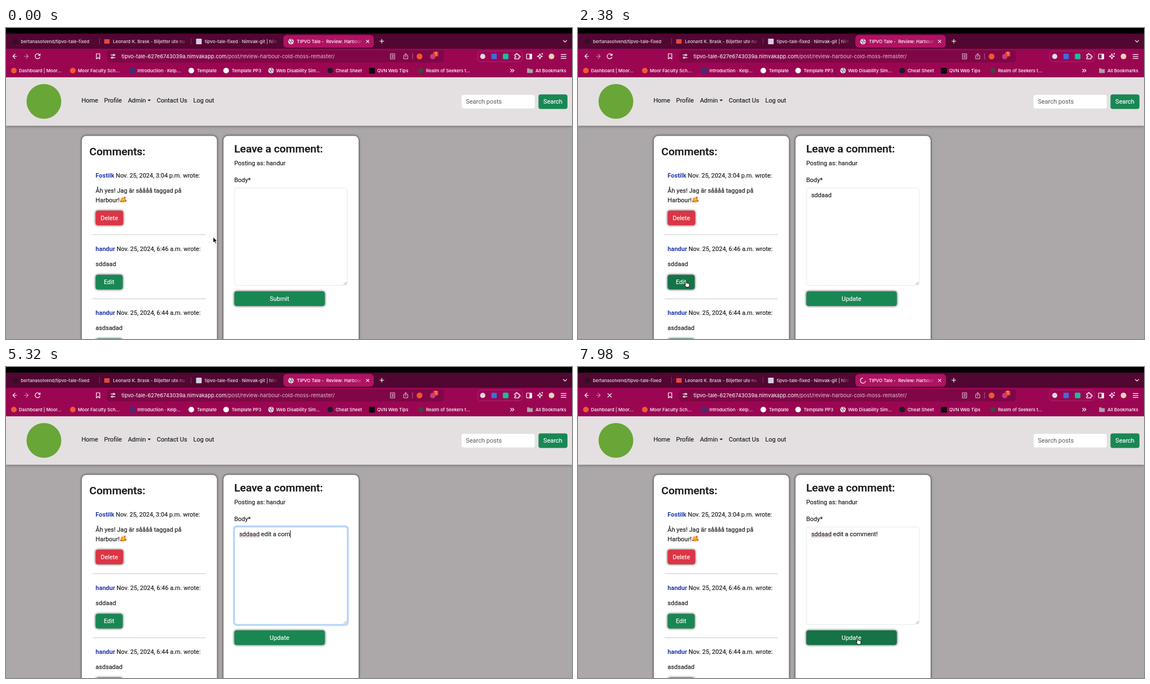
These frames come from a looping animation (1008 by 555 pixels, 8 s). An HTML page:

```html
<!DOCTYPE html>
<html lang="en">
<head>
<meta charset="utf-8">
<title>Edit a comment</title>
<style>
  html, body { margin: 0; width: 100%; height: 100%; overflow: hidden; background: #aca8a9; }
  svg { display: block; width: 1008px; height: 555px; }
  text { white-space: pre; }
  .ui { font: 500 8px Inter, sans-serif; fill: #fff; }
  .tab { fill: #ecd9e3; }
  .url { font-size: 9.42px; font-weight: 400; }
  .page { font: 400 11px Roboto, sans-serif; fill: #15171a; }
  .page text { stroke: #15171a; stroke-width: .15; }
  .page .head { font-size: 19.25px; font-weight: 500; stroke-width: .25; }
  .page .user { font-weight: 700; fill: #2039ab; stroke: none; }
  .page .btn { fill: #fff; stroke: #fff; text-anchor: middle; }
  .page .hint { fill: #54595e; stroke: none; }
  .line { fill: none; stroke: #fff; stroke-width: 1.2; stroke-linecap: round; stroke-linejoin: round; }
  .raised { filter: drop-shadow(0 0 2px rgba(0, 0, 0, .8)); }
  .card { fill: #fff; filter: drop-shadow(0 0 2.2px rgba(0, 0, 0, .85)); }
  .green { fill: #198754; }
  .rule { stroke: #c6c6c8; stroke-width: 1; }
</style>
</head>
<body>
<svg viewBox="0 0 1008 555">
  <defs>
    <linearGradient id="fadeStrip"><stop stop-color="#520632" stop-opacity="0"/><stop offset=".65" stop-color="#520632"/></linearGradient>
    <linearGradient id="fadeTab"><stop stop-color="#b01263" stop-opacity="0"/><stop offset=".65" stop-color="#b01263"/></linearGradient>
    <g id="globe">
      <circle r="5" fill="#f1e9ed"/>
      <path d="M-3.8-1.6Q-1.5-.8-1 .8T.6 3.8M-1.2-4.2Q2.4-3.6 1.4-1.6T4.2 .8" fill="none" stroke="#5d5660" stroke-width="1.3"/>
    </g>
  </defs>

  <!-- Page -->
  <rect width="1008" height="555" fill="#aca8a9"/>
  <rect y="88" width="1008" height="86.5" fill="#e4e0e2" style="filter:drop-shadow(0 1px 2.5px rgba(0,0,0,.4))"/>
  <circle cx="67.5" cy="131" r="31" fill="#68a637"/>
  <g class="page">
    <text x="134.5" y="133.3">Home</text>
    <text x="174.8" y="133.3">Profile</text>
    <text x="217.2" y="133.3">Admin</text>
    <path d="M252 127.8h6l-3 3z"/>
    <text x="268.6" y="133.3">Contact Us</text>
    <text x="333.6" y="133.3">Log out</text>
    <rect x="811" y="119" width="131" height="25" rx="4" fill="#fff" stroke="#dee2e6" stroke-width=".7"/>
    <text x="819" y="135.3" class="hint">Search posts</text>
    <rect x="948.3" y="118.4" width="51.6" height="26" rx="4" class="green"/>
    <text x="974" y="135.3" class="btn">Search</text>

    <rect x="135" y="192.5" width="240.7" height="390" rx="8" class="card"/>
    <rect x="387.3" y="192.5" width="240.7" height="390" rx="8" class="card"/>

    <text x="148.6" y="227.3" class="head">Comments:</text>
    <text x="159.6" y="266.8"><tspan class="user">Fostilk</tspan> Nov. 25, 2024, 3:04 p.m. wrote:</text>
    <text x="159.6" y="293.8">Åh yes! Jag är såååå taggad på</text>
    <text x="159.6" y="310.6">Harbour!</text>
    <g transform="translate(208.8 306.6)">
      <circle r="5.2" fill="#fcc33c"/>
      <path d="M-3-1.2q1-1.3 2 0M1-1.2q1-1.3 2 0M-2.3 1.6q2.3 2.4 4.6 0" fill="none" stroke="#713d12" stroke-width=".9"/>
      <g fill="#ef4055"><circle cx="-4" cy="2.8" r="1.6"/><circle cx="4.2" cy="1.8" r="1.6"/><circle cx="2.9" cy="-4.2" r="1.4"/></g>
    </g>
    <rect x="159.7" y="326" width="48.9" height="26" rx="4" fill="#dc3545" class="raised"/>
    <text x="184" y="342.8" class="btn">Delete</text>
    <path d="M154.5 368.8h201.5M154.5 483.2h201.5" class="rule"/>

    <text x="159.6" y="397.6"><tspan class="user">handur</tspan> Nov. 25, 2024, 6:46 a.m. wrote:</text>
    <text x="159.6" y="425">sddaad</text>
    <rect id="edit" x="159.7" y="440.4" width="48" height="26" rx="4" class="green raised"/>
    <text x="183.5" y="457.2" class="btn">Edit</text>

    <text x="159.6" y="512.1"><tspan class="user">handur</tspan> Nov. 25, 2024, 6:44 a.m. wrote:</text>
    <text x="159.6" y="539.4">asdsadad</text>
    <rect x="159.7" y="554.4" width="48" height="26" rx="4" class="green raised"/>

    <text x="406.4" y="221.8" class="head">Leave a comment:</text>
    <text x="406.4" y="244.8">Posting as: handur</text>
    <text x="406.4" y="275">Body*</text>
    <rect id="ring" x="405.5" y="284" width="203.8" height="176.8" rx="5" fill="none" stroke="#c2dbfe" stroke-width="2.8"/>
    <rect id="box" x="407" y="285.5" width="200.8" height="173.8" rx="4" fill="#fff" stroke="#dee2e6" stroke-width=".8"/>
    <path d="M601.5 458l5-5M604.5 458l2-2" stroke="#777" stroke-width=".8"/>
    <path id="spell" d="M415.8 303.3h36" stroke="#e0483f" stroke-width="1" stroke-dasharray="1.3 1.2"/>
    <text id="typed" x="415.4" y="302"></text>
    <rect id="caret" y="291.5" width="1" height="13" fill="#111"/>
    <rect id="send" x="406.7" y="470" width="161" height="26" rx="4" class="green raised"/>
    <text id="sendText" x="487" y="487" class="btn"></text>
  </g>

  <!-- Browser: tab strip -->
  <rect width="1008" height="10" fill="#000"/>
  <rect y="10" width="1008" height="27" fill="#520632"/>
  <rect x="494" y="12.5" width="161" height="22.5" rx="6" fill="#b01263"/>
  <g class="ui">
    <circle cx="17" cy="24" r="4.8" fill="#30101f"/>
    <text x="26.5" y="27" class="tab">bertanasolvend/tipvo-tale-fixed</text>
    <rect x="175" y="20" width="9.5" height="8" fill="#e4483b"/>
    <text x="190.5" y="27" class="tab">Leonard K. Brask - Biljetter ute nu</text>
    <rect x="338.5" y="19" width="10" height="10" rx="1" fill="#d7cde5"/>
    <text x="354" y="27" class="tab">tipvo-tale-fixed · Nimvak-git | Nim</text>
    <rect x="302" y="14" width="34" height="20" fill="url(#fadeStrip)"/>
    <rect x="466" y="14" width="28" height="20" fill="url(#fadeStrip)"/>
    <path d="M166.5 18v11M329.5 18v11" stroke="#8d3a67" stroke-width=".8"/>
    <text x="518" y="27">TIPVO Tale -  Review: Harbour</text>
    <rect x="614" y="14" width="34" height="20" fill="url(#fadeTab)"/>
    <use id="favicon" href="#globe" x="507.5" y="24.2"/>
    <circle id="spinner" r="4.6" class="line" stroke-width="1.3" pathLength="100" stroke-dasharray="70 30"/>
    <path d="M641.8 21.6l4.6 4.6m0-4.6l-4.6 4.6M665.8 23.5h7M669.3 20v7M992.5 22.2l3 3 3-3" class="line"/>
  </g>

  <!-- Browser: toolbar -->
  <rect y="37" width="1008" height="51" fill="#9b0653"/>
  <rect x="180" y="40" width="600" height="21.5" rx="5" fill="#7f0747"/>
  <rect x="840" y="41" width="79.5" height="19" rx="5" fill="#9b0653" stroke="#b23a77" stroke-width=".7"/>
  <g class="line">
    <path d="M18.5 50.5h-6m3.3-3.8l-3.8 3.8 3.8 3.8" transform="translate(.3)"/>
    <path d="M32.8 50.5h6m-3-3.8l3.8 3.8-3.8 3.8" opacity=".5"/>
    <path id="reload" d="M60.2 48.4A4.4 4.4 0 1 0 60.4 52M60.7 46v2.9h-2.9"/>
    <path id="stop" d="M53 47.3l6.6 6.6m0-6.6l-6.6 6.6"/>
    <path d="M161 46h6v9.2l-3-2.4-3 2.4z"/>
    <path d="M187 48.2h3M193.8 48.2h.4M187 52.8h.4M191 52.8h3.2"/>
    <circle cx="192" cy="48.2" r="1.3"/><circle cx="189" cy="52.8" r="1.3"/>
    <g stroke-width=".9" opacity=".85">
      <path d="M685 46h7.2v9.2H685zM687 48.6h3.2M687 50.6h3.2M687 52.6h3.2"/>
      <path d="M710 49h-1.8v6h7.4v-6h-1.8M711.9 52v-6.4m-2 2l2-2 2 2"/>
      <path d="M724 45.5v10" opacity=".5"/>
    </g>
    <path d="M906 47.7h2.5q-.8-2.4 1-2.4t1 2.4h3v2.6q2.4-.8 2.4 1t-2.4 1v2.9H906v-2.6q2.2 0 2.2-1.3T906 50z"/>
    <rect x="927" y="46.5" width="9" height="8.6" rx="1"/>
    <path d="M933 46.5h3v8.6h-3z" fill="#fff"/>
    <path d="M950.8 46l1.2 3.4 3.4 1.2-3.4 1.2-1.2 3.4-1.2-3.4-3.4-1.2 3.4-1.2zM955 45v2M954 46h2"/>
    <path d="M988.5 47.3h9M988.5 50.8h9M988.5 54.3h9"/>
  </g>
  <circle cx="736.5" cy="50.7" r="5.2" fill="#f4562c"/>
  <circle cx="760" cy="51" r="4.8" fill="#c43d7e"/>
  <rect x="760.8" y="42" width="9.2" height="9" rx="2.4" fill="#e8412e"/>
  <circle cx="849" cy="50.7" r="4.6" fill="#e4dbe1"/>
  <rect x="864.5" y="46" width="9.5" height="9.5" rx="1" fill="#3a6fe0"/>
  <rect x="884.8" y="45.8" width="10" height="10" rx="2" fill="#16c09a"/>
  <circle cx="971.5" cy="50.7" r="5" fill="#e9d3b0"/>
  <g class="ui">
    <text x="765.4" y="49.3" text-anchor="middle" style="font-size:7px">1</text>
    <text x="205.8" y="54" class="url">tipvo-tale-627e6743039a.nimvakapp.com<tspan fill="#e2bfd1">/post/review-harbour-cold-moss-remaster/</tspan></text>

    <!-- Bookmarks -->
    <g id="marks"></g>
    <circle cx="14" cy="76" r="5" fill="#f2592f"/>
    <circle cx="119" cy="76" r="5" fill="#f2592f"/>
    <rect x="220" y="71" width="10" height="10" rx="2" fill="#472a72"/>
    <circle cx="330" cy="76" r="5"/>
    <circle cx="392" cy="76" r="5"/>
    <use href="#globe" x="472" y="76"/>
    <circle cx="577.5" cy="76" r="5" fill="#1d1c20"/>
    <rect x="646.5" y="71" width="10.5" height="10.5" rx="1" fill="#0c0b0d"/>
    <circle cx="739" cy="76" r="4.6" fill="#3c4a3a"/>
    <path d="M898.5 73.4l2.6 2.6-2.6 2.6M902 73.4l2.6 2.6-2.6 2.6" class="line"/>
    <path d="M928 72h3.6l1.2 1.4h5.4v6.8H928z" fill="#a9a3a6"/>
  </g>

  <!-- Pointer -->
  <g id="pointer">
    <path id="arrow" d="M0 0v10.2l2.3-2 1.6 3.6 1.7-.7-1.6-3.5h3z" fill="#000" stroke="#fff" stroke-width=".8"/>
    <path id="beam" d="M-2.3-5.2Q0-5.4 0-3.8Q0-5.4 2.3-5.2M0-3.8V3.8M-2.3 5.2Q0 5.4 0 3.8Q0 5.4 2.3 5.2M-1.2 1.6h2.4" fill="none" stroke="#111" stroke-width="1"/>
    <path id="hand" d="M-1 .8Q0-.6 1 .8V4q1-.7 1.8.2 1-.5 1.6.5 1.4-.4 1.5 1V8.4L4.8 11H.3L-2.6 7.2q-.5-1.6 1.6-.6z" fill="#fff" stroke="#000" stroke-width=".9" stroke-linejoin="round"/>
  </g>
</svg>

<script>
const LOOP = 8000, STEP = 70;
const el = id => document.getElementById(id);
const show = (id, on) => { el(id).style.display = on ? '' : 'none'; };
const ramp = (t, from, length = 150) => Math.min(1, Math.max(0, (t - from) / length));
const mix = (a, b, k) => `rgb(${a.map((v, i) => Math.round(v + (b[i] - v) * k))})`;

const GREEN = [25, 135, 84], DARK = [21, 115, 71];
const BORDER = [222, 226, 230], FOCUS = [134, 183, 254];
const ADDED = ' edit a comment! ';
const KEYS = [3570, 3990, 4200, 4270, 4340, 4480, 4900, 4970, 5040, 5110,
  5320, 5460, 5530, 5670, 5880, 6160, 6230];
const LOADED = 2240, CLICK = 3120, BLUR = 7420, SENT = 7490;

// Pointer path: time, x, y
const PATH = [
  [560, 369, 373], [840, 275, 432], [980, 226, 466], [1120, 210, 464.5],
  [1400, 195, 449], [1680, 192.5, 451.5], [2380, 192.5, 451.5], [2520, 240, 430],
  [2660, 400, 345], [2800, 507, 298], [2870, 507, 298], [3010, 506.5, 301.5],
  [6580, 506.5, 301.5], [6650, 504, 345], [6720, 502, 389], [6790, 502, 389],
  [7210, 499, 477], [7420, 498, 484]
];

const MARKS = [
  [23, 'Dashboard | Moor...'], [128, 'Moor Faculty Sch...'], [234, 'Introduction · Kelp...'],
  [340, 'Template'], [402, 'Template PP3'], [481, 'Web Disability Sim...'],
  [587, 'Cheat Sheet'], [661, 'QVN Web Tips'], [748, 'Realm of Seekers t...'], [943, 'All Bookmarks']
];
el('marks').innerHTML = MARKS.map(([x, s]) => `<text x="${x}" y="79">${s}</text>`).join('');

function pointerAt(t) {
  const i = PATH.findIndex(p => p[0] > t);
  if (i === 0) return PATH[0].slice(1);
  if (i < 0) return PATH[PATH.length - 1].slice(1);
  const [t0, x0, y0] = PATH[i - 1], [t1, x1, y1] = PATH[i];
  const k = (t - t0) / (t1 - t0);
  return [x0 + (x1 - x0) * k, y0 + (y1 - y0) * k];
}

function inside(id, x, y) {
  const r = el(id), n = k => +r.getAttribute(k);
  return x > n('x') && x < n('x') + n('width') && y > n('y') && y < n('y') + n('height');
}

function draw(time) {
  const t = Math.floor(time / STEP) * STEP;

  const [x, y] = pointerAt(t);
  const hand = inside('edit', x, y) || inside('send', x, y);
  const beam = inside('box', x, y);
  el('pointer').setAttribute('transform', `translate(${x} ${y})`);
  show('pointer', t < KEYS[0] || t >= 6650);
  show('hand', hand);
  show('beam', beam);
  show('arrow', !hand && !beam);

  el('edit').style.fill = mix(GREEN, DARK, ramp(t, 1150) - ramp(t, 2400));
  el('send').style.fill = mix(GREEN, DARK, ramp(t, 7150));
  el('sendText').textContent = t < LOADED ? 'Submit' : 'Update';

  const focus = ramp(t, CLICK, 100) - ramp(t, BLUR);
  el('ring').style.opacity = focus;
  el('box').style.stroke = mix(BORDER, FOCUS, focus);
  show('spell', t >= CLICK);

  const typed = el('typed');
  typed.textContent = t < LOADED ? '' : 'sddaad' + ADDED.slice(0, KEYS.filter(k => k <= t).length);
  const blink = t >= 6720 && t < 7210;
  show('caret', t >= CLICK && t < BLUR && !blink);
  el('caret').setAttribute('x', 415.4 + typed.getComputedTextLength());

  const busy = t >= SENT;
  show('reload', !busy);
  show('stop', busy);
  show('favicon', !busy);
  show('spinner', busy);
  const turn = (7980 - t) * .3;
  el('spinner').setAttribute('transform', `translate(507.5 24.2) rotate(${turn + 10})`);
}

const start = performance.now();
function tick() {
  draw((performance.now() - start) % LOOP);
  requestAnimationFrame(tick);
}
tick();
</script>
</body>
</html>
```
